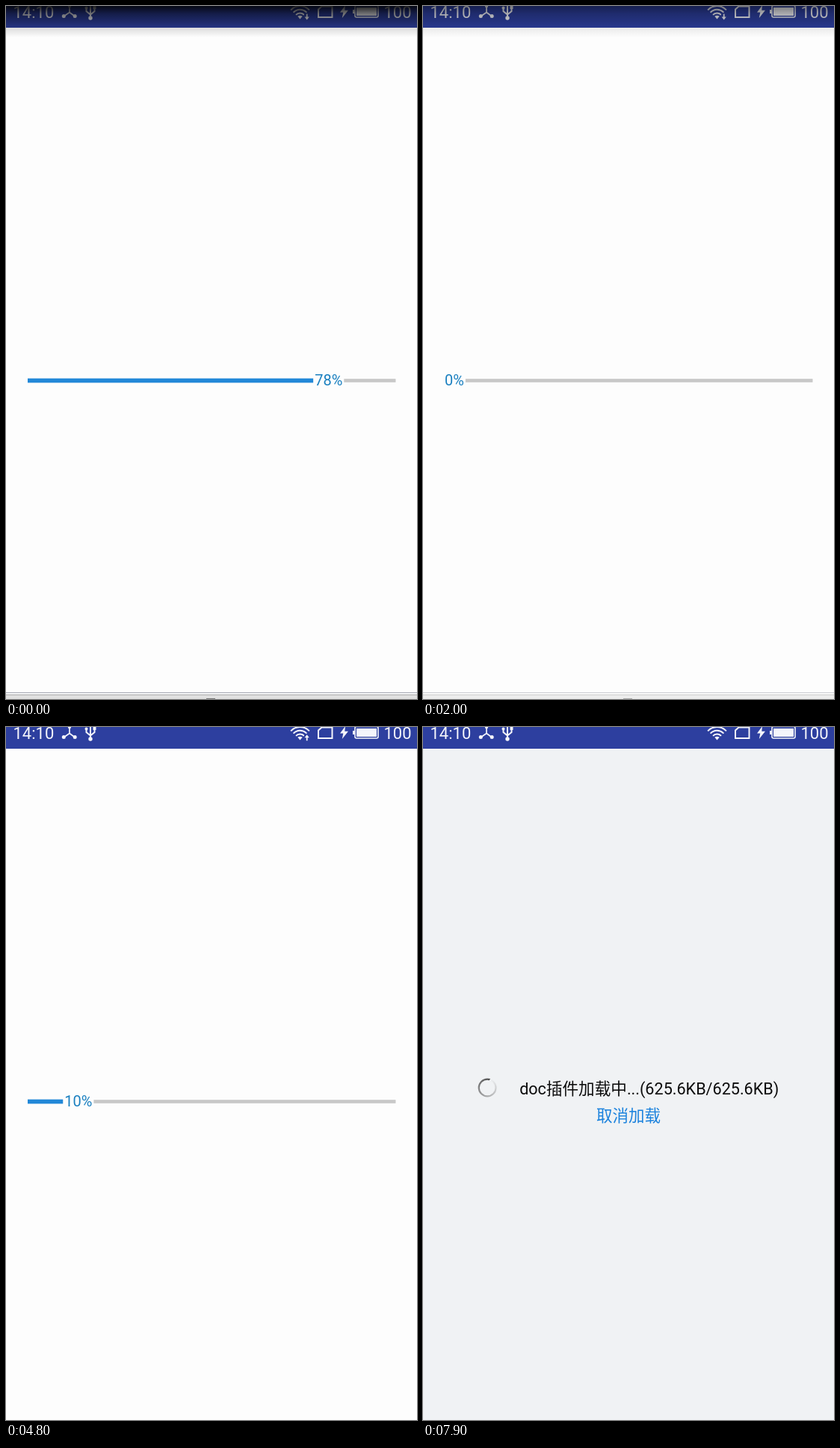
These frames come from a looping animation (550 px wide and 926 px high, 8 s). An HTML page with a canvas:

```html
<!DOCTYPE html>
<html lang="zh-CN">
<head>
<meta charset="utf-8">
<style>
html, body { margin: 0; width: 550px; height: 926px; overflow: hidden; background: #fdfdfd; }
canvas { display: block; }
</style>
</head>
<body>
<canvas id="stage" width="550" height="926"></canvas>
<script>
const W = 550, H = 926, LOOP = 8000, STEP = 100;
const c = document.getElementById('stage').getContext('2d');
const font = size => `${size}px Roboto, "Noto Sans CJK SC", "Noto Sans CJK", sans-serif`;

function rect(x, y, w, h, color) {
  c.fillStyle = color;
  c.fillRect(x, y, w, h);
}

function text(str, x, y, size, color) {
  c.font = font(size);
  c.fillStyle = color;
  c.fillText(str, x, y);
}

function dot(x, y, r) {
  c.beginPath();
  c.arc(x, y, r, 0, 2 * Math.PI);
  c.fill();
}

const line = (d, width) => { c.lineWidth = width; c.stroke(new Path2D(d)); };
const shape = d => c.fill(new Path2D(d));

// Value of the last [time, value] entry that has been reached
const at = (track, t) => track.filter(k => k[0] <= t).pop()[1];

const percents = [[0, 78], [100, 90], [200, 100], [400, 0], [4800, 10], [4900, 36], [5000, 72], [5100, 100]];
const arrows = [[0, 'down'], [400, ''], [900, 'down'], [1500, ''], [1900, 'down'], [2900, ''],
  [3900, 'up'], [4900, 'down'], [7900, '']];
const slides = [[0, 0], [1500, 149], [1600, 18.5], [1700, 0]];
const sizes = [[0, ''], [5900, '(312.8KB/625.6KB)'], [6000, '(625.6KB/625.6KB)']];

function progressPage(t) {
  const x = at(slides, t), p = at(percents, t), left = 29, right = 521.5;
  if (x) {
    rect(0, 0, x, H, '#d6d6d6');
    rect(0, 0, x, 113, '#33479f');
    const g = c.createLinearGradient(0, 113, 0, 119);
    g.addColorStop(0, 'rgba(0,0,0,.2)');
    g.addColorStop(1, 'rgba(0,0,0,0)');
    rect(0, 113, x, 6, g);
  }
  c.save();
  c.translate(x, 0);
  rect(x ? -1.5 : 0, 29, W, H, '#fdfdfd');
  rect(x ? -1.5 : 0, 0, W + 2, 29, '#2d3f9f');
  c.font = font(20);
  const label = p + '%', w = c.measureText(label).width;
  const start = Math.min(left + (right - left) * p / 100, right - w);
  if (p) rect(left, 497.6, start - 2 - left, 5.8, '#2288d8');
  text(label, start, 507, 20, '#1b80c0');
  const rest = start + w + 2;
  if (rest < right) rect(rest, 498.2, right - rest, 4.6, '#c8c8c8');
  c.restore();
}

function spinner(x, y, angle) {
  const g = c.createConicGradient(angle, x, y);
  g.addColorStop(0, 'rgba(90,90,90,0)');
  g.addColorStop(.25, 'rgba(90,90,90,.25)');
  g.addColorStop(1, 'rgba(80,80,80,1)');
  c.strokeStyle = g;
  c.lineWidth = 2.2;
  c.beginPath();
  c.arc(x, y, 11.4, 0, 2 * Math.PI);
  c.stroke();
}

function loadingPage(t, kind, phase) {
  rect(0, 29, W, H, '#f0f2f4');
  rect(0, 0, W, 29, '#2d3f9f');
  const label = kind + '插件加载中...' + at(sizes, t);
  c.font = font(21.6);
  const x = 302.7 - c.measureText(label).width / 2;
  text(label, x, 490.5, 21.6, '#0c0c0c');
  text('取消加载', 232, 527, 21.5, '#1b82dd');
  spinner(x - 43, 482, (t * .36 + phase) * Math.PI / 180);
}

function statusIcons(arrow) {
  const white = '#f4f5fb';
  text('14:10', 9.5, 15.5, 22, white);
  text('100', 505.5, 15.5, 22, white);
  c.fillStyle = c.strokeStyle = white;

  line('M85 0V8.5L77 14M85 8.5L92.5 14', 1.7);
  dot(85, 0, 2.2);
  dot(77.3, 13.6, 2.5);
  dot(92.2, 13.6, 2.5);

  line('M113 0V17M107.5 2V7L113 11.5L118.5 7V2', 2);
  dot(113, 16, 2.7);
  dot(107.5, 2.5, 2);
  rect(116.5, 0, 4, 4, white);

  c.lineWidth = 2;
  for (const r of [7.5, 12.2, 17]) {
    c.beginPath();
    c.arc(393.5, 17, r, -Math.PI * .76, -Math.PI * .24);
    c.stroke();
  }
  shape('M393.5 17.5L390.3 13.8Q393.5 11.6 396.7 13.8Z');
  if (arrow) {
    rect(399, 9.5, 7, 9.5, '#2d3f9f');
    c.fillStyle = white;
    shape(arrow == 'down'
      ? 'M401.8 10.5h1.8v4h2.2l-3.1 4l-3.1-4h2.2Z'
      : 'M401.8 18.2h1.8v-4h2.2l-3.1-4l-3.1 4h2.2Z');
  }

  line('M418 15V4.5L422.5 .5H436.5V15Z', 2);
  shape('M454 -1L447 8.5H451.3L449.8 16L458 5.8H453.3Z');
  line('M469 -.5H496Q498 -.5 498 1.5V13Q498 15 496 15H469Q467 15 467 13V1.5Q467 -.5 469 -.5Z', 1.6);
  rect(469, 2, 27, 11, white);
  rect(464, 5, 2.5, 5, white);
}

// Window controls that lie over the top and bottom edges
function windowEdges(alpha) {
  c.save();
  c.globalAlpha = alpha;
  const g = c.createLinearGradient(0, 0, 0, 42);
  [[0, .88], [.24, .55], [.48, .36], [.67, .2], [.7, .13], [1, 0]]
    .forEach(([p, a]) => g.addColorStop(p, `rgba(0,0,0,${a})`));
  rect(0, 0, W, 42, g);
  rect(0, 917, W, 1, '#a9abb6');
  rect(0, 918, W, 2, '#f4f4f5');
  rect(0, 920, W, 1, '#adadad');
  rect(0, 921, W, 5, '#e0e0e0');
  rect(268, 925, 12, 1, '#777');
  c.restore();
}

function draw(now) {
  const t = Math.floor(now % LOOP / STEP) * STEP;
  c.clearRect(0, 0, W, H);
  if (t >= 400 && t < 1500) loadingPage(t, 'pdf', 26);
  else if (t >= 5200) loadingPage(t, 'doc', -37);
  else progressPage(t);
  statusIcons(at(arrows, t));
  const edges = Math.min(1, Math.max(0, (2400 - t) / 700));
  if (edges) windowEdges(edges);
  requestAnimationFrame(draw);
}
requestAnimationFrame(draw);
</script>
</body>
</html>
```
